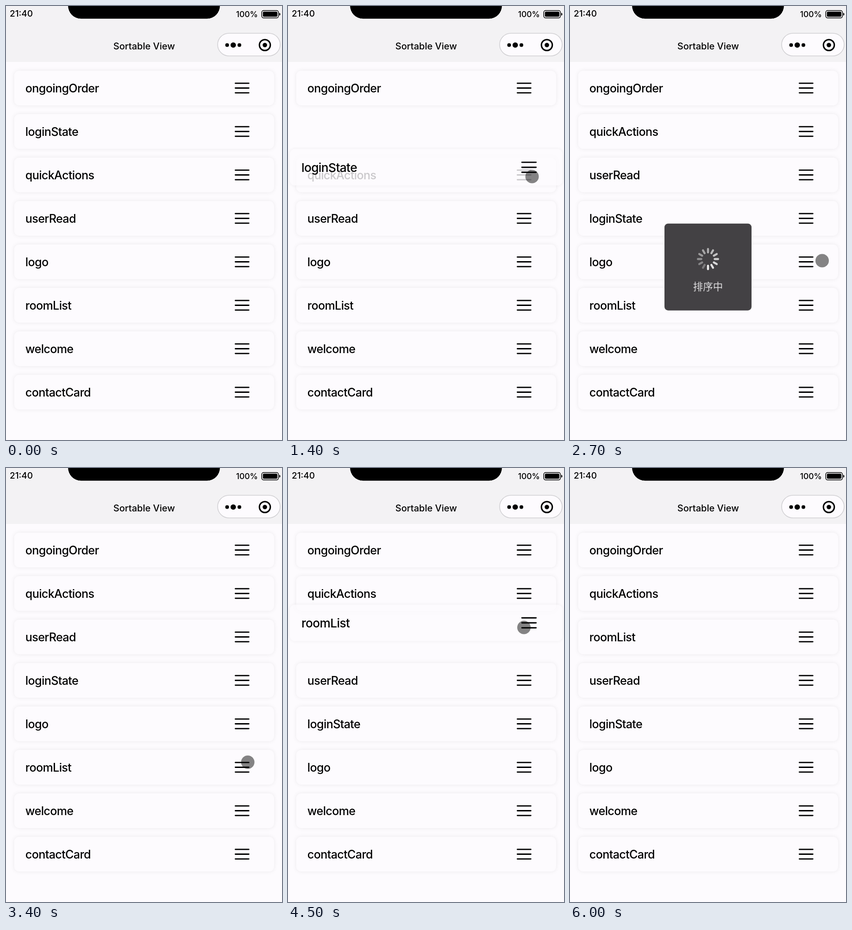
Write an HTML page that moves like this. It is 596 px wide and 939 px high and loops after 6.5 s.

```html
<!DOCTYPE html>
<html lang="zh-CN">
<head>
<meta charset="utf-8">
<title>Sortable View</title>
<style>
  html, body { margin: 0; width: 100%; height: 100%; overflow: hidden; background: #fdfbfe; }
  svg { display: block; font-family: Inter, Roboto, sans-serif; font-weight: 450; }
  .card rect { fill: #fdfbfe; filter: drop-shadow(0 0 4px rgba(0, 0, 0, .07)); }
  .card text { font-size: 25px; letter-spacing: -.58px; }
  .card path { stroke: #000; stroke-width: 2.8; stroke-linecap: round; }
  #toast text { font: 21.5px "Noto Sans CJK SC", "Noto Sans CJK", sans-serif; fill: #dddcde; }
</style>
</head>
<body>
<svg width="596" height="939">
  <rect width="596" height="121" fill="#f3f2f4"/>
  <path d="M133.500 -1A28.500 29 0 0 0 162 28H434A28.500 29 0 0 0 462.500 -1Z" stroke="#fff"/>
  <text x="8" y="22.500" font-size="19">21:40</text>
  <text x="544" y="24" font-size="17.500" text-anchor="end">100%</text>
  <rect x="552.300" y="9.800" width="36" height="16" rx="4" fill="none" stroke="#000" stroke-width="1.500"/>
  <rect x="554.800" y="12.300" width="31" height="11" rx="2"/>
  <path d="M590 14.500Q592.500 15.500 592.500 17.700T590 21Z"/>
  <text x="298.300" y="94" font-size="20" text-anchor="middle">Sortable View</text>
  <rect x="457" y="59" width="135" height="49" rx="24.500" fill="#fdfbfe" stroke="#d2d1d4" stroke-width="1.600"/>
  <circle cx="477.500" cy="84.500" r="4"/>
  <circle cx="490.700" cy="84.500" r="5.800"/>
  <circle cx="504" cy="84.500" r="4"/>
  <circle cx="559" cy="84.500" r="11.800" fill="none" stroke="#000" stroke-width="3"/>
  <circle cx="559" cy="84.500" r="4.800"/>
  <g id="list"></g>
  <g id="toast">
    <rect x="204" y="470.700" width="188" height="188" rx="8" fill="#434144"/>
    <g id="spinner" stroke="#fff" stroke-width="4.400" stroke-linecap="round"></g>
    <text x="298" y="615" text-anchor="middle">排序中</text>
  </g>
  <circle id="pointer" r="14.500" fill="#000" fill-opacity=".48"/>
</svg>
<script>
const LOOP = 6500, STEP = 100, PITCH = 94, TOP = 177.5, EASE_MS = 300, TOAST_MS = 800;
const names = ['ongoingOrder', 'loginState', 'quickActions', 'userRead',
  'logo', 'roomList', 'welcome', 'contactCard'];

// The card glides by "dist" pixels between "from" and "to", then settles "slots" away
const drags = [
  { card: 1, lift: 650, from: 1070, to: 2000, dist: 268.5, drop: 2030, toast: 2200, slots: 2 },
  { card: 5, lift: 3800, from: 3840, to: 4290, dist: -312.5, drop: 4950, toast: 5050, slots: -3 }
];

// Pointer legs: start, end, x, y reached
const entry = [504, 318];
const legs = [
  [100, 700, 512.5, 284], [750, 1050, 519, 286], [1040, 2000, 544.5, 548], [2000, 2100, 544.5, 551],
  [2900, 3600, 516.5, 657.5], [3830, 4272, 509.5, 345], [5600, 5900, 564, 324]
];

const $ = id => document.getElementById(id);
const mix = (a, b, p) => a + (b - a) * p;
const progress = (t, a, b) => Math.min(1, Math.max(0, (t - a) / (b - a)));
const glide = (t, a, b) => { const u = progress(t, a, b); return u * u * (3 - 2 * u); };
const glideTime = (part, a, b) => mix(a, b, .5 - Math.sin(Math.asin(1 - 2 * part) / 3));

// CSS "ease": cubic-bezier(.25, .1, .25, 1)
function ease(ms) {
  const x = progress(ms, 0, EASE_MS);
  if (x === 0 || x === 1) return x;
  let lo = 0, hi = 1;
  for (let i = 0; i < 24; i++) {
    const u = (lo + hi) / 2;
    if (.75 * u * (1 - u) + u ** 3 < x) lo = u; else hi = u;
  }
  const v = 1 - lo;
  return .3 * v * v * lo + 3 * v * lo * lo + lo ** 3;
}

// Each neighbour makes room once the dragged card has passed another full slot
const shifts = [], order = names.map((_, i) => i);
for (const d of drags) {
  const at = order.indexOf(d.card), dir = Math.sign(d.slots);
  for (let k = 1; k <= Math.abs(d.slots); k++) {
    const start = glideTime(k * PITCH / Math.abs(d.dist), d.from, d.to);
    shifts.push({ card: order[at + k * dir], start, by: -dir * PITCH });
  }
  order.splice(at, 1);
  order.splice(at + d.slots, 0, d.card);
}

$('list').innerHTML = names.map(name => `<g class="card">
  <rect x="-280.500" y="-37.500" width="561" height="75" rx="11"/>
  <text x="-256.500" y="9.800">${name}</text>
  <path d="M197 -10.300h29M197 0h29M197 10.300h29"/></g>`).join('');
const cards = [...$('list').children];

$('spinner').innerHTML = Array.from({ length: 12 }, (_, i) =>
  `<path d="M0 -14.500V-21.800" transform="rotate(${i * 30})" opacity="${.3 + .055 * i}"/>`).join('');

function draw(t) {
  const y = names.map((_, i) => TOP + i * PITCH);
  const raised = names.map(() => 0);
  for (const s of shifts) y[s.card] += s.by * ease(t - s.start);
  for (const d of drags) {
    const settle = ease(t - d.drop);
    y[d.card] += mix(d.dist * glide(t, d.from, d.to), d.slots * PITCH, settle);
    raised[d.card] = ease(t - d.lift) * (1 - settle);
    if (t < d.lift) y[d.card] -= d.slots * PITCH * settle;
  }
  cards.forEach((card, i) => {
    card.setAttribute('transform', `translate(298.3 ${y[i]}) scale(${1 + .05 * raised[i]})`);
    card.firstElementChild.setAttribute('opacity', 1 - .2 * raised[i]);
  });
  const top = cards[drags[t < 3000 ? 0 : 1].card];
  if ($('list').lastChild !== top) $('list').append(top);

  const shown = drags.find(d => t >= d.toast && t < d.toast + TOAST_MS);
  $('toast').style.display = shown ? '' : 'none';
  if (shown) {
    const turn = Math.floor((t - shown.toast + 80) * 12 / 1000) * 30 + 30;
    $('spinner').setAttribute('transform', `translate(298 547.5) rotate(${turn})`);
  }

  let [px, py] = entry;
  for (const [a, b, x, y] of legs) {
    const p = glide(t, a, b);
    px = mix(px, x, p);
    py = mix(py, y, p);
  }
  $('pointer').setAttribute('cx', px);
  $('pointer').setAttribute('cy', py);
  $('pointer').style.display = t >= 100 && t < 6000 ? '' : 'none';
}

const begin = performance.now();
function frame() {
  const t = (performance.now() - begin) % LOOP;
  draw(Math.floor(t / STEP) * STEP);
  requestAnimationFrame(frame);
}
frame();
</script>
</body>
</html>
```
